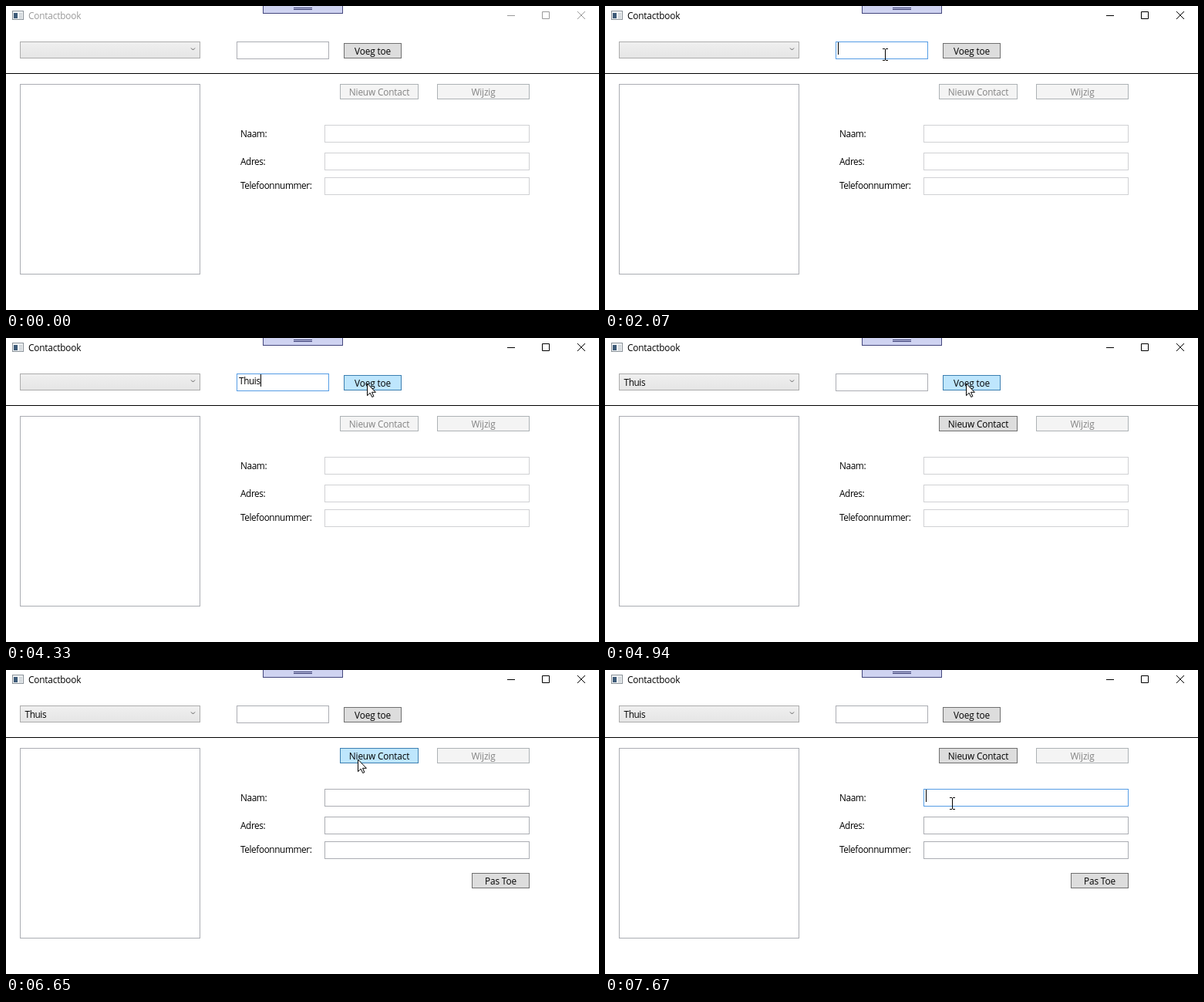
An HTML page for the animation above (8000 ms loop, 769 by 394 pixels).

```html
<!DOCTYPE html>
<html lang="nl">
<head>
<meta charset="utf-8">
<title>Contactbook</title>
<style>
  html, body { margin: 0; width: 100%; height: 100%; overflow: hidden; background: #fff; }
  svg { display: block; width: 769px; height: 394px; }
  text { font: 11.8px "Open Sans", "Noto Sans", sans-serif; letter-spacing: -.4px; }
  .title, .button text { letter-spacing: -.15px; }
  .chrome { fill: none; stroke: #000; }
  .idle .title { fill: #999; }
  .idle .chrome { stroke: #999; }
  .field rect { fill: #fff; stroke: #abadb3; }
  .field.off rect { stroke: #d0d1d4; }
  .field.hover rect { stroke: #7eb4ea; }
  .field.focus rect { stroke: #569de5; }
  .button rect { fill: #ddd; stroke: #707070; }
  .button text { text-anchor: middle; }
  .button.off rect { fill: #f4f4f4; stroke: #adb2b5; }
  .button.off text { fill: #838383; }
  .button.hover rect { fill: #bee6fd; stroke: #3c7fb1; }
  .button.down rect { fill: #c4e5f6; stroke: #2c628b; }
</style>
</head>
<body>
<svg id="app" viewBox="0 0 769 394">
  <defs>
    <linearGradient id="face" x2="0" y2="1">
      <stop stop-color="#f0f0f0"/><stop offset="1" stop-color="#e5e5e5"/>
    </linearGradient>
  </defs>
  <rect width="769" height="394" fill="#fff"/>

  <rect x="8.5" y="6.5" width="14" height="11" fill="#f2f4f5" stroke="#8a9299"/>
  <rect x="10" y="9" width="5" height="7" fill="#3d5a78"/>
  <path d="M17 9.5h4M17 11.5h4M17 13.5h4M17 15.5h4" stroke="#b9c1c7"/>
  <text class="title" x="29" y="17">Contactbook</text>
  <path class="chrome" d="M650 12.5h10M695.5 7.5h9v9h-9zM741 7l10 10M751 7l-10 10"/>

  <rect x="333.5" y="-2.5" width="103" height="12" fill="#cfd3f1" stroke="#44477e"/>
  <path d="M373 2.5h24M373 4.5h24" stroke="#33366e"/>

  <rect x="18.5" y="46.5" width="233" height="21" fill="url(#face)" stroke="#acacac"/>
  <path d="M240 54.5l2.5 2.5 2.5-2.5" fill="none" stroke="#606060"/>
  <text id="picked" x="24.5" y="62"></text>
  <path d="M0 87.5h769" stroke="#000"/>
  <rect x="18.5" y="101.5" width="233" height="246" fill="#fff" stroke="#abadb3"/>

  <text x="304" y="170">Naam:</text>
  <text x="304" y="206">Adres:</text>
  <text x="304" y="237">Telefoonnummer:</text>
  <g id="controls"></g>
  <text id="typed" x="302" y="60"></text>
  <rect id="caret" width="1" height="16"/>

  <circle id="click" r="12" fill="#ff0" fill-opacity=".47"/>
  <path id="arrow" d="M.5 1V16.7L4.2 13.2 6.7 18.5 8.9 17.6 6.5 12.3H11.4Z" fill="#fff" stroke="#000" stroke-linejoin="round"/>
  <path id="beam" d="M-3-7.5H0M1-7.5H4M.5-7V7M-3 7.5H0M1 7.5H4" fill="none" stroke="#000"/>
</svg>
<script>
const LOOP = 8000, STEP = 77;
const $ = id => document.getElementById(id);

function control(kind, x, y, w, h, label = '') {
  const g = document.createElementNS('http://www.w3.org/2000/svg', 'g');
  g.innerHTML = `<rect x="${x + .5}" y="${y + .5}" width="${w - 1}" height="${h - 1}"/>` +
    `<text x="${x + w / 2}" y="${y + 15}">${label}</text>`;
  $('controls').append(g);
  return {
    x, y,
    hit: (px, py) => px >= x && px < x + w && py >= y && py < y + h,
    look: state => g.setAttribute('class', kind + ' ' + state),
    show: on => g.style.display = on ? '' : 'none'
  };
}
const group = control('field', 299, 46, 120, 23);
const [naam, adres, telefoon] = [154, 190, 222].map(y => control('field', 413, y, 266, 23));
const add = control('button', 438, 48, 75, 20, 'Voeg toe');
const create = control('button', 433, 101, 102, 20, 'Nieuw Contact');
const edit = control('button', 559, 101, 120, 20, 'Wijzig');
const apply = control('button', 604, 263, 75, 20, 'Pas Toe');

// Each move follows a Bezier curve through its control points
const moves = [
  { from: 210, to: 910, path: [[402, 366], [363, 63]] },
  { from: 3940, to: 4330, path: [[374, 63], [468, 58]] },
  { from: 5260, to: 5940, path: [[455, 72], [230, 110], [235, 190], [433, 124]] },
  { from: 5940, to: 6260, path: [[433, 124], [456, 115]] },
  { from: 6820, to: 7120, path: [[454, 125], [450, 173]] }
];
const keys = [2390, 2620, 2850, 2930, 3080];

const show = (id, on) => $(id).style.display = on ? '' : 'none';
const place = (id, x, y) => $(id).setAttribute('transform', `translate(${x} ${y})`);
const mix = (a, b, p) => a + (b - a) * p;

function bezier(points, p) {
  if (points.length === 1) return points[0];
  return bezier(points.slice(1).map((b, i) => b.map((v, j) => mix(points[i][j], v, p))), p);
}

function pointerAt(t) {
  const { from, to, path } = moves.findLast(m => t >= m.from) || moves[0];
  const count = Math.round((to - from) / STEP);
  const step = Math.floor((t - from + 8) / STEP);
  const p = Math.max(0, Math.min(1, step / count));
  return bezier(path, 1 - (1 - p) ** 2).map(Math.round);
}

function draw(t) {
  const within = (a, b) => t >= a && t < b;
  const added = t >= 4940, open = t >= 6650;
  const [x, y] = pointerAt(t);
  const visible = t >= 210 && !within(2390, 3940);
  const over = c => visible && c.hit(x, y);
  const hover = c => over(c) ? 'hover' : '';

  $('app').setAttribute('class', t < 980 ? 'idle' : '');
  group.look(within(1070, 4710) ? 'focus' : hover(group));
  naam.look(!open ? 'off' : t >= 7520 ? 'focus' : hover(naam));
  adres.look(open ? '' : 'off');
  telefoon.look(open ? '' : 'off');
  add.look(within(4710, 4790) ? 'down' : hover(add));
  create.look(!added ? 'off' : within(6580, 6650) ? 'down' : hover(create));
  edit.look('off');
  apply.look('');
  apply.show(open);

  const typed = $('typed');
  typed.textContent = added ? '' : 'Thuis'.slice(0, keys.filter(k => t >= k).length);
  $('picked').textContent = added ? 'Thuis' : '';
  show('caret', within(1070, 1610) || within(2070, 3690) || within(4170, 4710) || t >= 7520);
  if (open) place('caret', naam.x + 3, naam.y + 1);
  else place('caret', group.x + 3 + Math.round(typed.getComputedTextLength()), group.y + 1);

  const beam = over(group) || open && over(naam);
  show('beam', visible && beam);
  show('arrow', visible && !beam);
  place('beam', x, y);
  place('arrow', x, y);
  show('click', within(1070, 1150) || within(4710, 4790) || within(6580, 6650) || within(7520, 7670));
  place('click', beam ? x - 2 : x, beam ? y - 1 : y);
}

let start;
function tick(now) {
  start ??= now;
  draw((now - start) % LOOP);
  requestAnimationFrame(tick);
}
draw(0);
requestAnimationFrame(tick);
</script>
</body>
</html>
```
